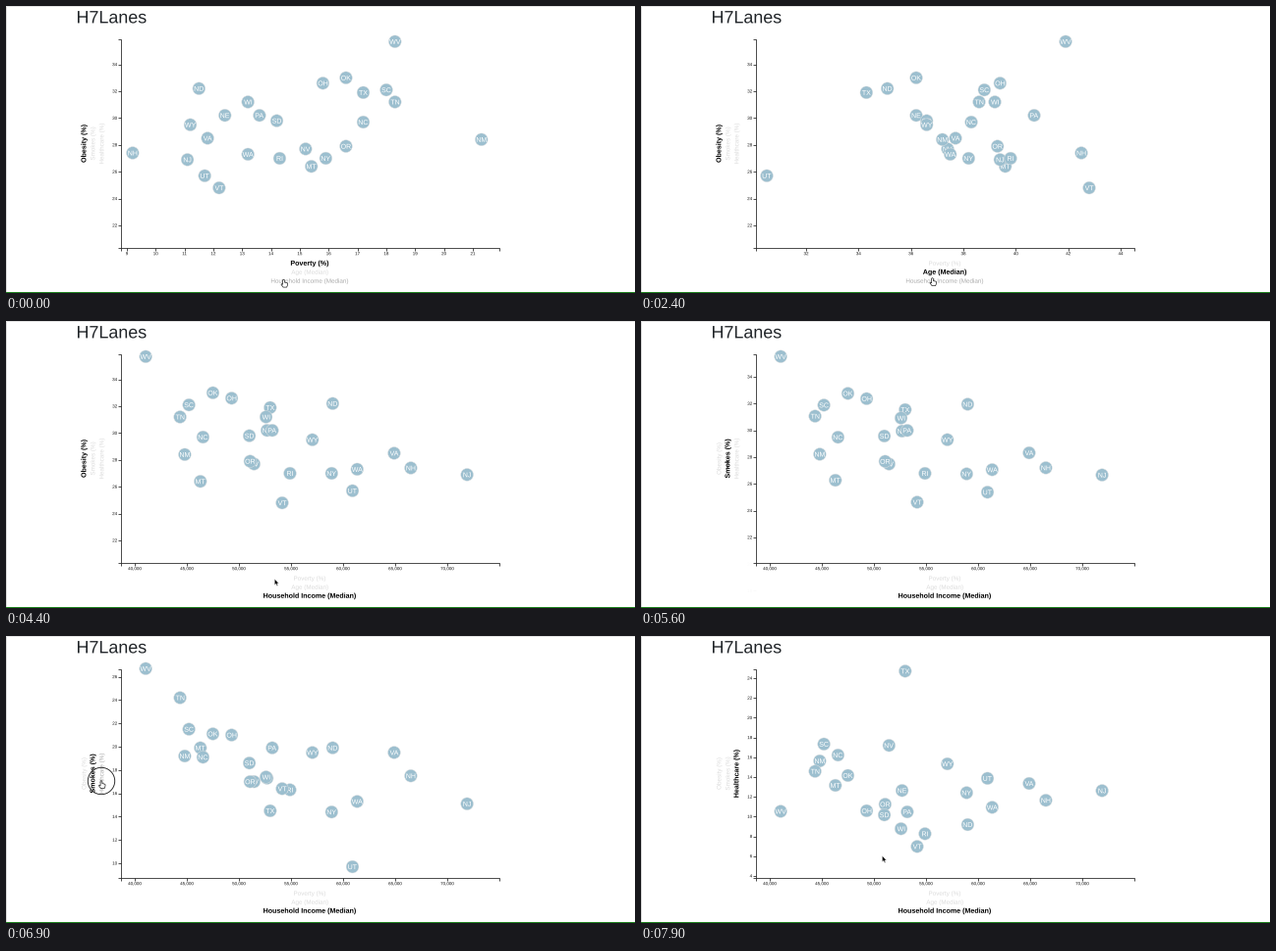
Recreate the animation shown at these times as a matplotlib script. Size 640 by 293 pixels, loop 8 s.

```python
import matplotlib.pyplot as plt
import numpy as np
from matplotlib.animation import FuncAnimation
from matplotlib.patches import Circle, PathPatch, Polygon, Rectangle
from matplotlib.path import Path
from matplotlib.text import Text
from matplotlib.textpath import TextPath
from matplotlib.transforms import Affine2D

W, H, DPI = 640, 293, 100
LOOP, STEP = 8000, 100
PX = 72 / DPI  # one pixel in points

plt.rcParams["font.family"] = "Liberation Sans"
FONTS = {w: Text(0, 0, "", weight=w).get_fontproperties() for w in ("normal", "bold")}

STATES = ("MT NE NV NH NJ NM NY NC ND OH OK OR PA RI SC SD TN TX UT VT VA WA WV WI WY").split()

POVERTY = [15.4, 12.4, 15.2, 9.2, 11.1, 21.3, 15.9, 17.2, 11.5, 15.8, 16.6, 16.6, 13.6,
           14.3, 18.0, 14.2, 18.3, 17.2, 11.7, 12.2, 11.8, 13.2, 18.3, 13.2, 11.2]
AGE = [39.6, 36.2, 37.4, 42.5, 39.4, 37.2, 38.2, 38.3, 35.1, 39.4, 36.2, 39.3, 40.7,
       39.8, 38.8, 36.6, 38.6, 34.3, 30.5, 42.8, 37.7, 37.5, 41.9, 39.2, 36.6]
INCOME = [46300, 52700, 51450, 66500, 71900, 44800, 58900, 46550, 59000, 49300, 47500, 51075, 53200,
          54900, 45200, 51000, 44350, 53000, 60900, 54150, 64900, 61350, 41050, 52600, 57050]
OBESITY = [26.4, 30.2, 27.7, 27.4, 26.9, 28.4, 27.0, 29.7, 32.2, 32.6, 33.0, 27.9, 30.2,
           27.0, 32.1, 29.8, 31.2, 31.9, 25.7, 24.8, 28.5, 27.3, 35.7, 31.2, 29.5]
SMOKES = [19.9, 17.3, 17.0, 17.5, 15.1, 19.2, 14.4, 19.1, 19.9, 21.0, 21.1, 17.0, 19.9,
          16.3, 21.5, 18.6, 24.2, 14.5, 9.7, 16.4, 19.5, 15.3, 26.7, 17.4, 19.5]
HEALTH = [13.1, 12.6, 17.2, 11.6, 12.6, 15.6, 12.4, 16.2, 9.1, 10.5, 14.1, 11.2, 10.4,
          8.2, 17.3, 10.1, 14.5, 24.8, 13.9, 6.9, 13.3, 10.9, 10.4, 8.7, 15.3]


class Measure:
    """A variable with its linear pixel scale, ticks and axis caption."""

    def __init__(self, caption, values, ref, pixel, per_unit, ticks):
        self.caption, self.values, self.ticks = caption, np.array(values), set(ticks)
        self.ref, self.pixel, self.per_unit = ref, pixel, per_unit

    def scale(self, v):
        return self.pixel + (v - self.ref) * self.per_unit


X_SET = [
    Measure("Poverty (%)", POVERTY, 9, 123, 29.33, range(9, 22)),
    Measure("Age (Median)", AGE, 32, 168, 26.67, range(32, 45, 2)),
    Measure("Household Income (Median)", INCOME, 40000, 131, 0.0106, range(40000, 70001, 5000)),
]
Y_SET = [
    Measure("Obesity (%)", OBESITY, 22, 224, -13.7, range(22, 35, 2)),
    Measure("Smokes (%)", SMOKES, 10, 232, -11.9, range(10, 27, 2)),
    Measure("Healthcare (%)", HEALTH, 4, 244.5, -10.08, range(4, 25, 2)),
]
X_SWITCH, Y_SWITCH = (820, 3030), (5420, 7020)
RINGS = ((700, 900), (2900, 3100), (5300, 5500), (6900, 7100))

# Pointer hot spot: time, x, y
POINTER = np.array([
    (0, 282.5, 279.5), (300, 293.5, 272), (500, 293.5, 271.5), (2000, 293.5, 271.5),
    (2400, 296.5, 278), (4300, 296.5, 278), (5200, 88, 147), (6200, 88, 147),
    (6800, 97, 148), (7100, 97, 148), (7800, 245.5, 224.5),
])

fig = plt.figure(figsize=(W / DPI, H / DPI), dpi=DPI, facecolor="white")
ax = fig.add_axes([0, 0, 1, 1])
ax.set_xlim(0, W)
ax.set_ylim(H, 0)
ax.axis("off")
chart = Rectangle((72, 24), 448, 267, transform=ax.transData)


def place(artist, x, y):
    artist.set_transform(Affine2D().translate(x, y) + ax.transData)


def add(artist, x=0, y=0, clip=False):
    ax.add_patch(artist)
    place(artist, x, y)
    if clip:
        artist.set_clip_path(chart)
    return artist


def glyphs(text, size, align=0.5, weight="normal", turn=0):
    """Outline of a text on its baseline; align 0, 0.5 or 1 from left to right."""
    path = TextPath((0, 0), text, size=size, prop=FONTS[weight])
    box = path.get_extents()
    shift = -(box.x0 + align * box.width)
    return Affine2D().translate(shift, 0).scale(1, -1).rotate_deg(turn).transform_path(path)


def text(path, color, x=0, y=0, z=2, clip=False):
    return add(PathPatch(path, fc=color, lw=0, zorder=z), x, y, clip)


def stroke(points, width=0.8, color="#222222", z=2, clip=False):
    patch = PathPatch(Path(points), fill=False, ec=color, lw=width * PX, zorder=z,
                      capstyle="butt", joinstyle="miter")
    return add(patch, clip=clip)


# Page frame and heading
add(Rectangle((0, 0), 1, H, fc="#dedede", lw=0))
add(Rectangle((0, 0), W, 1, fc="#e6e6e6", lw=0))
add(Rectangle((0, 291.5), W, 1.5, fc="#1f821f", lw=0, zorder=9))
text(glyphs("H7Lanes", 17.9, align=0), "#212529", 73, 17.4)

# Axis lines with their outer ticks
stroke([(117, 249.7), (117, 247), (501.5, 247), (501.5, 249.7)])
stroke([(114.3, 33.5), (117, 33.5), (117, 247), (114.3, 247)])


class Axis:
    def __init__(self, measures, switches, vertical):
        self.measures, self.switches, self.vertical = measures, switches, vertical
        self.ticks = {}
        for v in set().union(*(m.ticks for m in measures)):
            if vertical:
                mark = stroke([(114.3, 0), (117, 0)], clip=True)
                path = Affine2D().translate(113, 1.5).transform_path(glyphs(f"{v:,}", 4.5, 1))
            else:
                mark = stroke([(0, 247), (0, 249.7)], clip=True)
                path = Affine2D().translate(0, 254.2).transform_path(glyphs(f"{v:,}", 4.5))
            self.ticks[v] = mark, text(path, "#111111", clip=True)
        self.captions = []
        for k, m in enumerate(measures):
            turn = -90 if vertical else 0
            at = (81.4 + 8.97 * k, 140.5) if vertical else (309, 264.8 + 8.97 * k)
            idle = text(glyphs(m.caption, 6.3, turn=turn), "#dcdcdc", *at)
            bold = text(glyphs(m.caption, 7.1, weight="bold", turn=turn), "black", *at)
            self.captions.append((idle, bold))

    def blend(self, t):
        done = [s for s in self.switches if t >= s]
        new = len(done)
        if not new:
            return 0, 0, 1
        p = min((t - done[-1]) / 1000, 1)
        ease = 4 * p ** 3 if p < 0.5 else 1 - 4 * (1 - p) ** 3
        return new - 1, new, ease

    def hit(self, x, y):
        """Index of the caption under the pointer, or None."""
        along, across = (y - 140.5, x - 79) if self.vertical else (x - 309, y - 262.3)
        k = int(np.floor(across / 8.97 + 0.5))
        if 0 <= k < 3 and abs(along) < len(self.measures[k].caption) * 1.7:
            return k
        return None

    def update(self, t, pointer):
        """Move ticks and captions; return data pixels, active and hovered index."""
        i, active, e = self.blend(t)
        old, new = self.measures[i], self.measures[active]
        for v, parts in self.ticks.items():
            pos = old.scale(v) * (1 - e) + new.scale(v) * e
            alpha = (v in old.ticks) * (1 - e) + (v in new.ticks) * e
            for part in parts:
                part.set_visible(alpha > 0.01 and 0 < pos < W)
                part.set_alpha(alpha)
                place(part, *((0, pos) if self.vertical else (pos, 0)))
        hover = self.hit(*pointer)
        for k, (idle, bold) in enumerate(self.captions):
            idle.set_visible(k != active)
            bold.set_visible(k == active)
            idle.set_facecolor("#ababab" if k == hover else "#dcdcdc")
        data = old.scale(old.values) * (1 - e) + new.scale(new.values) * e
        return data, active, hover


x_axis = Axis(X_SET, X_SWITCH, vertical=False)
y_axis = Axis(Y_SET, Y_SWITCH, vertical=True)

bubbles = []
for n, name in enumerate(STATES):
    z = 3 + n / 50
    disc = add(Circle((0, 0), 6.4, fc="#9cbfcf", ec="#e3e3e3", lw=0.4 * PX, zorder=z), clip=True)
    bubbles.append((disc, text(glyphs(name, 7), "white", 0, 2.5, z + 0.01, clip=True)))

# Pointer shapes, hot spot at the origin
HAND = [(-0.9, 0.2), (0, -0.4), (0.8, 0.2), (0.9, 2.6), (3.6, 3.2), (4.1, 4), (3.8, 6),
        (3.1, 7.6), (-0.4, 7.6), (-2.5, 4.9), (-2.1, 4.1), (-0.9, 4.8)]
ARROW = [(0, 0), (0, 6), (1.4, 4.8), (2.4, 7), (3.3, 6.6), (2.4, 4.5), (4.2, 4.4)]
BEAM = Path([(-1.4, -3.6), (0, -3.1), (1.4, -3.6), (0, -3.1), (0, 3.1),
             (-1.4, 3.6), (0, 3.1), (1.4, 3.6)], [1, 2, 2, 1, 2, 1, 2, 2])
shapes = {
    "hand": add(Polygon(HAND, fc="white", ec="#222222", lw=0.7 * PX, zorder=10)),
    "arrow": add(Polygon(ARROW, fc="black", ec="white", lw=0.3 * PX, zorder=10)),
    "beam": add(PathPatch(BEAM, fill=False, ec="#222222", lw=0.8 * PX, zorder=10)),
}
ring = add(Circle((0, 0), 13.7, fill=False, ec="#222222", lw=0.9 * PX, zorder=10))


def update(i):
    t = i * STEP
    pointer = [np.interp(t, POINTER[:, 0], POINTER[:, c]) for c in (1, 2)]
    xs, x_active, x_hover = x_axis.update(t, pointer)
    ys, y_active, y_hover = y_axis.update(t, pointer)
    for (disc, label), x, y in zip(bubbles, xs, ys):
        place(disc, x, y)
        place(label, x, y + 2.5)

    if x_hover is None and y_hover is None:
        kind = "arrow"
    elif x_hover == x_active or y_hover == y_active:
        kind = "beam"
    else:
        kind = "hand"
    for name, shape in shapes.items():
        shape.set_visible(name == kind)
        place(shape, *pointer)
    ring.set_visible(any(a <= t < b for a, b in RINGS))
    place(ring, *pointer)
    return []


anim = FuncAnimation(fig, update, frames=LOOP // STEP, interval=STEP,
                     repeat=True, repeat_delay=0, cache_frame_data=False)
plt.show()
```
